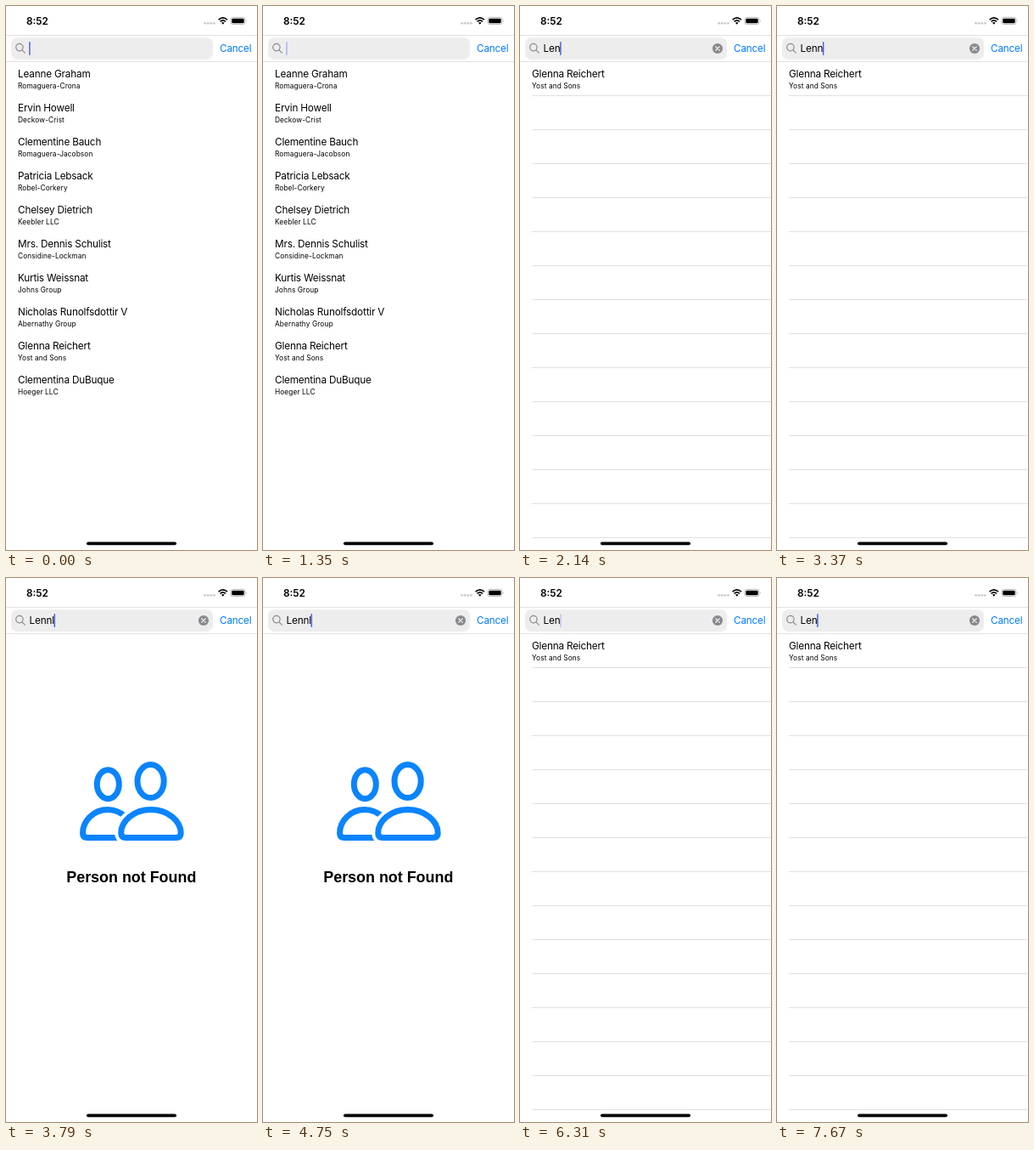
An HTML page for the animation above (8000 ms loop, 296 by 640 pixels).

```html
<!DOCTYPE html>
<html lang="en">
<head>
<meta charset="utf-8">
<title>People search</title>
<style>
  html, body { margin: 0; width: 100%; height: 100%; overflow: hidden; background: #fff; }
  svg { display: block; width: 100vw; height: 100vh; }
  text { font-family: Inter, Roboto, sans-serif; white-space: pre; }
  .body { font-size: 11.75px; letter-spacing: -.18px; }
  .sub { font-size: 8.3px; letter-spacing: .1px; }
  .clock { font-size: 11.75px; font-weight: 600; }
  .notice { font: bold 17.9px "Liberation Sans", Arial, sans-serif; text-anchor: middle; }
  .blue { fill: none; stroke: #0a84ff; stroke-width: 7; }
</style>
</head>
<body>
<svg viewBox="0 0 296 640">
  <rect width="296" height="640" fill="#fff"/>

  <!-- status bar -->
  <text class="clock" x="24" y="21.7">8:52</text>
  <g fill="#cacaca">
    <circle cx="234.6" cy="20.3" r="1.4"/><circle cx="238.2" cy="20.3" r="1.4"/>
    <circle cx="241.8" cy="20.3" r="1.4"/><circle cx="245.4" cy="20.3" r="1.4"/>
  </g>
  <g fill="none" stroke="#000" stroke-width="1.7">
    <path d="M250.6 16.2Q255.8 11.4 261 16.2M252.6 18.4Q255.8 15.4 259 18.4"/>
    <path d="M254 19.7Q255.8 18.3 257.6 19.7L255.8 21.7Z" fill="#000" stroke="none"/>
  </g>
  <rect x="265" y="13.4" width="17" height="8.2" rx="2.5" fill="none" stroke="#a8a8a8" stroke-width=".8"/>
  <rect x="266.3" y="14.7" width="14.4" height="5.6" rx="1.4"/>
  <path d="M283.2 16.2Q284.6 17.5 283.2 18.8Z" fill="#a8a8a8"/>

  <!-- search bar -->
  <path d="M0 34.5H296M0 65.5H296" stroke="#e2e2e2"/>
  <rect x="6" y="37.3" width="238" height="25.6" rx="7" fill="#ededee"/>
  <g fill="none" stroke="#8a8a8e" stroke-width="1.2" stroke-linecap="round">
    <circle cx="15.9" cy="48.6" r="4.2"/><path d="M19 51.8L22.3 55.1"/>
  </g>
  <text id="query" class="body" x="27.5" y="54"></text>
  <rect id="caret" y="42" width="1.5" height="16" rx=".7" fill="#4a62e0"/>
  <g id="clear">
    <circle cx="233" cy="50" r="6.1" fill="#8a8a8e"/>
    <path d="M230.8 47.8L235.2 52.2M235.2 47.8L230.8 52.2" stroke="#fff" stroke-width="1.2" stroke-linecap="round"/>
  </g>
  <text class="body" x="252" y="53.6" fill="#007aff">Cancel</text>

  <!-- results -->
  <path id="lines" stroke="#e1e1e1"/>
  <g id="rows"></g>

  <!-- empty state -->
  <g id="missing">
    <ellipse class="blue" cx="120.3" cy="242.7" rx="13" ry="17"/>
    <ellipse class="blue" cx="170.6" cy="239" rx="15.6" ry="19.6"/>
    <path class="blue" d="M134 305.5H96Q90.5 305.5 90.5 300C90.5 286 103 272.5 120 272.5C128 272.5 136 276 142 282"/>
    <path id="gap" fill="#fff" stroke="#fff" stroke-width="15"/>
    <path id="torso" class="blue"/>
    <text class="notice" x="147.8" y="357.6">Person not Found</text>
  </g>

  <rect x="95" y="630.4" width="106" height="3.8" rx="1.9"/>
</svg>
<script>
const PEOPLE = [
  ["Leanne Graham", "Romaguera-Crona"],
  ["Ervin Howell", "Deckow-Crist"],
  ["Clementine Bauch", "Romaguera-Jacobson"],
  ["Patricia Lebsack", "Robel-Corkery"],
  ["Chelsey Dietrich", "Keebler LLC"],
  ["Mrs. Dennis Schulist", "Considine-Lockman"],
  ["Kurtis Weissnat", "Johns Group"],
  ["Nicholas Runolfsdottir V", "Abernathy Group"],
  ["Glenna Reichert", "Yost and Sons"],
  ["Clementina DuBuque", "Hoeger LLC"]
];
const LOOP = 8000, ROW = 40, TOP = 65.5;

// [time in ms, value]; each value holds until the next step
const TYPING = [[0, ""], [1670, "L"], [1890, "Le"], [2140, "Len"], [2400, "Lenn"],
  [3790, "Lennl"], [5270, "Lenn"], [5700, "Len"]];
const BLINK = [[0, 1], [340, .4], [450, 0], [690, .5], [800, 1], [1350, .4], [1460, 0], [1670, 1],
  [3010, .3], [3250, .6], [3370, 1], [4290, .4], [4400, 0], [4640, .5], [4750, 1],
  [6310, .3], [6550, .6], [6660, 1], [7210, .4], [7320, 0], [7560, .5], [7670, 1]];

const el = id => document.getElementById(id);
const [query, caret, clear, lines, rows, missing] =
  ["query", "caret", "clear", "lines", "rows", "missing"].map(el);
const show = (node, on) => node.setAttribute("visibility", on ? "visible" : "hidden");
const valueAt = (steps, t) => steps.findLast(([start]) => start <= t)[1];

const torso = "M141.5 305.5H200.5Q206.2 305.5 206.2 300C206.2 286 191 272.5 170.8 272.5" +
  "S135.7 286 135.7 300Q135.7 305.5 141.5 305.5Z";
el("gap").setAttribute("d", torso);
el("torso").setAttribute("d", torso);
lines.setAttribute("d", Array.from({ length: 14 }, (_, i) => `M14 ${TOP + ROW * (i + 1)}H296`).join(""));

function search(text) {
  const found = PEOPLE.filter(([name]) => name.toLowerCase().includes(text.toLowerCase()));
  rows.innerHTML = found.map(([name, company], i) => `<g transform="translate(14 ${TOP + ROW * i})">
    <text class="body" y="18">${name}</text><text class="sub" y="31">${company}</text></g>`).join("");
  query.textContent = text;
  caret.setAttribute("x", 27.2 + (text ? query.getComputedTextLength() : 0));
  show(clear, text);
  show(lines, text && found.length);
  show(missing, !found.length);
}

let current = null;
function draw(now) {
  const t = now % LOOP, text = valueAt(TYPING, t);
  if (text !== current) search(current = text);
  caret.setAttribute("opacity", valueAt(BLINK, t));
}

const begin = performance.now();
function tick() {
  draw(performance.now() - begin);
  requestAnimationFrame(tick);
}
tick();
</script>
</body>
</html>
```
